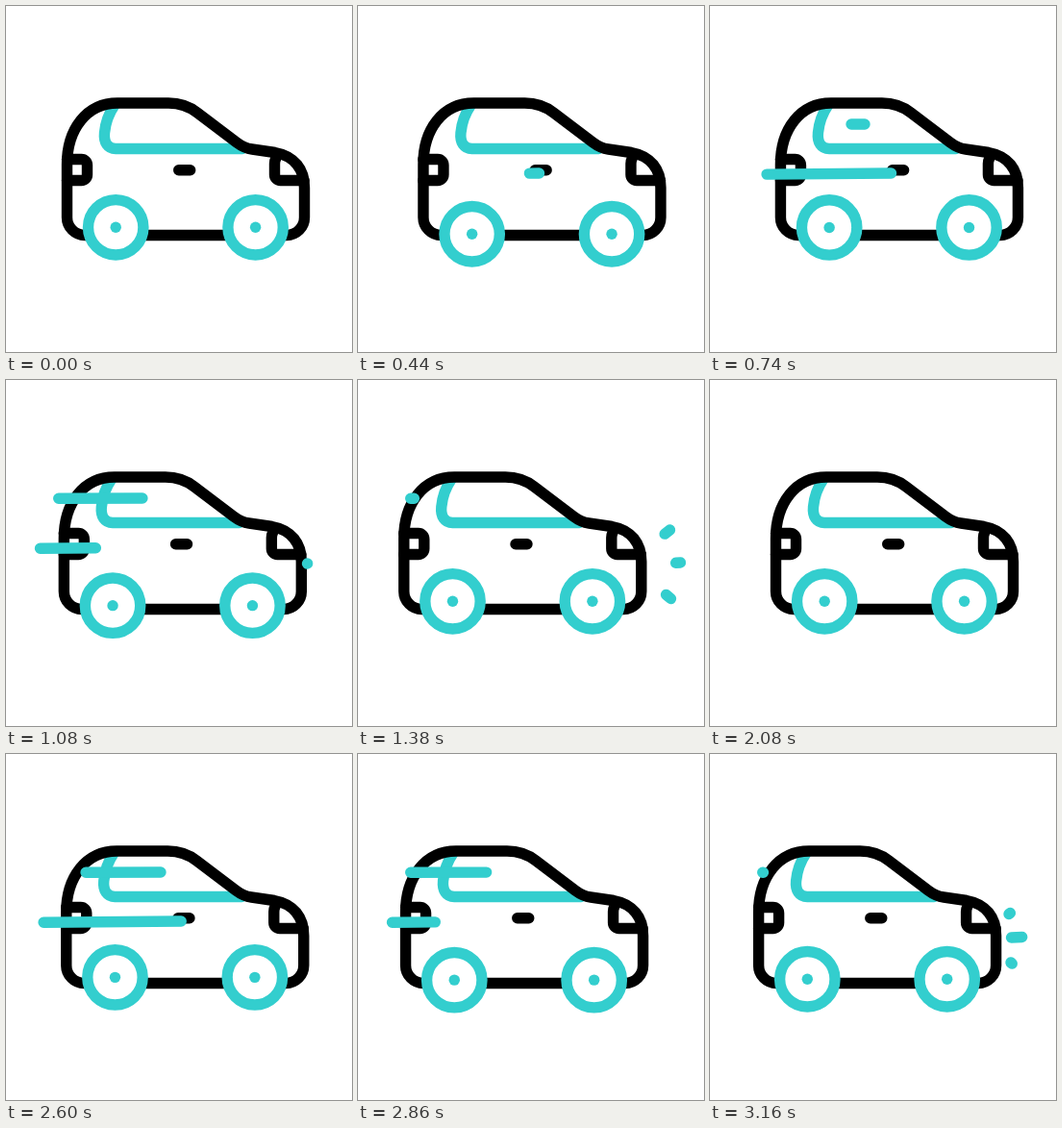
Write an HTML page that moves like this. It is 360 px wide and 360 px high and loops after 3180 ms.

```html
<!DOCTYPE html>
<html lang="en">
<head>
<meta charset="utf-8">
<title>Driving car</title>
<style>
  html, body { margin: 0; width: 100%; height: 100%; overflow: hidden; background: #fff; }
  svg { display: block; width: 100vw; height: 100vh; }
  .line { fill: none; stroke-width: 11.4; stroke-linecap: round; stroke-linejoin: round; }
  .black { stroke: #000; }
  .cyan { stroke: #33cece; }
</style>
</head>
<body>
<svg viewBox="0 0 360 360">
  <g id="car">
    <path class="line cyan" d="M113 103Q104 116 102.500 132C101.500 142 106 148.500 114 148.500H246"/>
    <g class="line black">
      <path d="M82 238.500A18.500 18.500 0 0 1 63.500 220V165C63.500 128 84 101 116 101H169C181 101 190 104 199 111L240 142Q248 148 256 149L280 152.500C300 156 310.500 170 310.500 189V220A18.500 18.500 0 0 1 292 238.500Z"/>
      <path d="M63.500 159.500H78.500a6 6 0 0 1 6 6V175.500a6 6 0 0 1 -6 6H63.500"/>
      <path d="M281 158Q279.500 161 279.500 164V175.500a6 6 0 0 0 6 6H310"/>
      <path d="M179.700 170.800H191.700"/>
    </g>
    <g id="wheels"></g>
  </g>
  <g id="dashes"></g>
</svg>
<script>
const LOOP = 3180;
const NS = 'http://www.w3.org/2000/svg';
const car = document.getElementById('car');
const wheels = document.getElementById('wheels');
const dashGroup = document.getElementById('dashes');

const clamp = v => Math.min(1, Math.max(0, v));
const mix = (a, b, k) => a + (b - a) * k;
const smooth = s => s * s * (3 - 2 * s);
const easeOut = s => Math.sin(s * Math.PI / 2);

function add(parent, tag, attrs) {
  const el = document.createElementNS(NS, tag);
  for (const name in attrs) el.setAttribute(name, attrs[name]);
  return parent.appendChild(el);
}

for (const cx of [114.2, 259.6]) {
  add(wheels, 'circle', { class: 'line cyan', cx, cy: 230.3, r: 28.7, style: 'fill:#fff' });
  add(wheels, 'circle', { cx, cy: 230.3, r: 5.7, fill: '#33cece' });
}

// Each dash grows along its path, then its tail catches up with its head.
// head and tail hold [delay, duration] counted from every start.
const streaks = [420, 2170];
const sparks = [1080, 3093];
const dashes = [
  { from: [188.5, 174], to: [35.5, 175.3], starts: streaks, head: [0, 500], tail: [370, 500] },
  { from: [161, 123], to: [54.7, 123.3], starts: streaks, head: [300, 250], tail: [530, 485] },
  { from: [313.5, 191], to: [335.5, 190], starts: sparks, head: [0, 200], tail: [120, 260] },
  { from: [311, 166.5], to: [324.5, 156], starts: sparks, head: [55, 200], tail: [170, 230] },
  { from: [313, 217], to: [325.5, 227.5], starts: sparks, head: [55, 200], tail: [170, 230] }
];
for (const dash of dashes) dash.el = add(dashGroup, 'line', { class: 'line cyan' });

// [time, horizontal offset]
const sway = [[200, 0], [720, 10], [1440, -16.2], [1515, -16.3], [2300, 10], [2985, -16.2], [3778, 10]];

function carOffset(t) {
  if (t <= sway[0][0]) return sway[0][1];
  const i = sway.findIndex(key => t < key[0]);
  const [t0, x0] = sway[i - 1], [t1, x1] = sway[i];
  return mix(x0, x1, smooth((t - t0) / (t1 - t0)));
}

function wheelDrop(t) {
  const hop = 515;
  const start = t < 2000 ? 200 : 2507;
  const s = (t - start) / hop;
  return s < 0 || s > 2 ? 0 : 7 * Math.sin(Math.PI * s) ** 2;
}

function drawDash({ el, from, to, starts, head, tail }, t) {
  const start = starts.filter(s => s + head[0] <= t).pop();
  const age = t - start;
  const visible = start !== undefined && age < tail[0] + tail[1];
  el.style.display = visible ? '' : 'none';
  if (!visible) return;
  const front = easeOut(clamp((age - head[0]) / head[1]));
  const back = Math.min(front, smooth(clamp((age - tail[0]) / tail[1])));
  el.setAttribute('x1', mix(from[0], to[0], back));
  el.setAttribute('y1', mix(from[1], to[1], back));
  // A tiny extra length keeps the round caps painted.
  el.setAttribute('x2', mix(from[0], to[0], front) + 0.01);
  el.setAttribute('y2', mix(from[1], to[1], front));
}

function render(t) {
  car.setAttribute('transform', `translate(${carOffset(t)} 0)`);
  wheels.setAttribute('transform', `translate(0 ${wheelDrop(t)})`);
  for (const dash of dashes) drawDash(dash, t);
}

const began = performance.now();
function tick() {
  render((performance.now() - began) % LOOP);
  requestAnimationFrame(tick);
}
tick();
</script>
</body>
</html>
```
